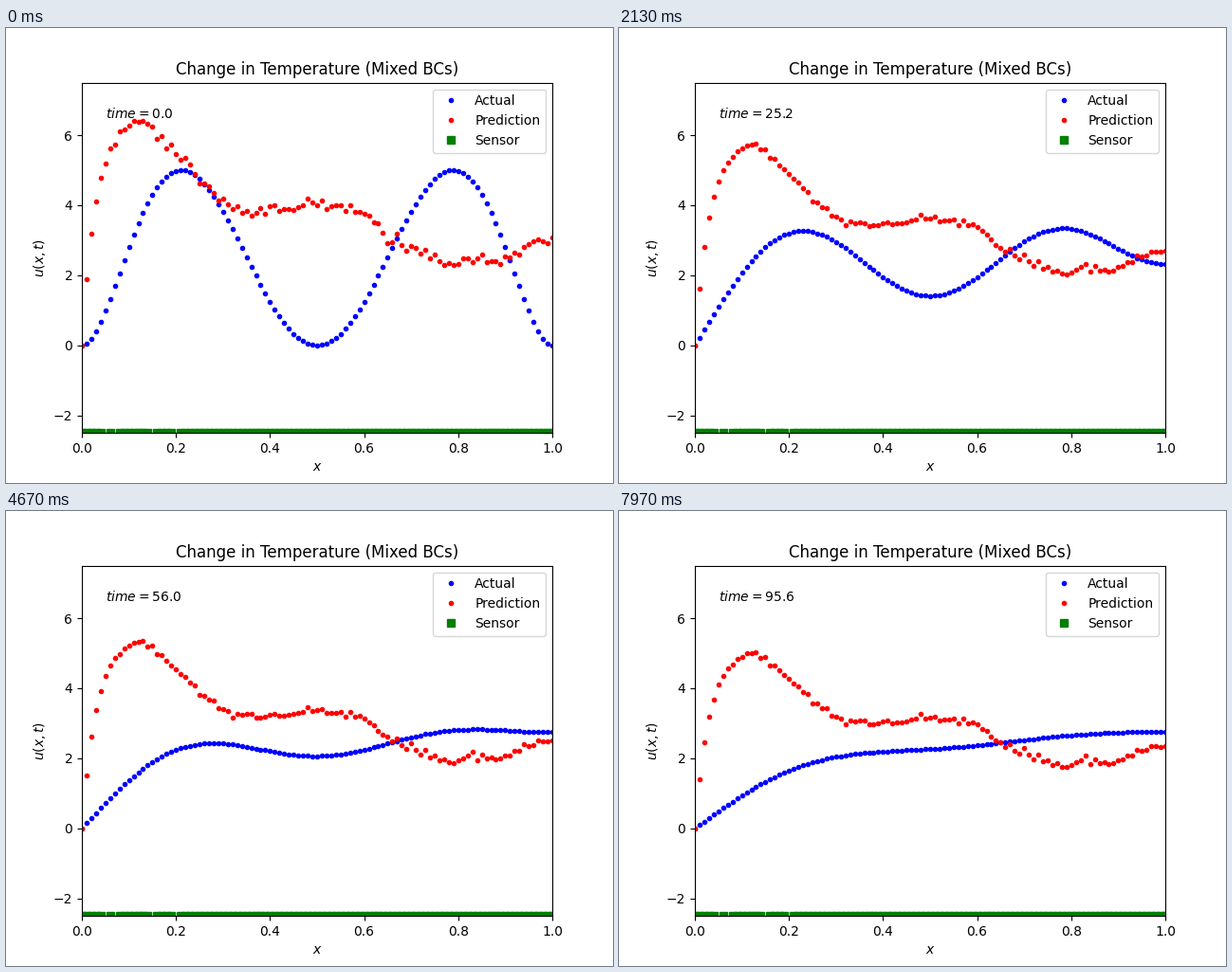
Write a matplotlib script that moves like this. It is 640 px wide and 480 px high and loops after 8 s.

```python
import numpy as np
import matplotlib.pyplot as plt
from matplotlib.animation import FuncAnimation

FRAMES = 240
LOOP_MS = 8000
DT = 0.4            # model time per frame
ALPHA = 3e-4        # diffusivity
T_REF = 36.4        # model time at which `profile` holds

x = np.linspace(0, 1, 101)


def initial(x):
    return 2160 * (x * (1 - x) * (x - 0.5)) ** 2


# Heat equation with u(0) = 0 and u_x(1) = 0, solved by its sine modes
k = (np.arange(80) + 0.5) * np.pi
s = (np.arange(4000) + 0.5) / 4000
coef = 2 * (initial(s) * np.sin(np.outer(k, s))).mean(axis=1)
modes = np.sin(np.outer(x, k))


def actual(t):
    return modes @ (coef * np.exp(-ALPHA * k ** 2 * t))


# Prediction: a steep rise into a bumpy slope, plus lasting and fading noise
key_x = [0, 0.13, 0.2, 0.25, 0.32, 0.4, 0.5, 0.59, 0.64, 0.75, 0.87, 1]
key_u = [5.7, 5.65, 4.78, 4.05, 3.38, 3.34, 3.54, 3.34, 2.78, 2.08, 2.12, 2.63]
profile = np.interp(x, key_x, key_u) * (1 - np.exp(-x / 0.031))

rng = np.random.default_rng(4)
ripple = 0.08 * np.sqrt(x) * rng.standard_normal(x.size)
jolt = 0.08 * rng.standard_normal(x.size)


def predicted(t):
    progress = np.log1p(t / 18) / np.log1p(T_REF / 18)
    return (profile * (1 + 0.15 * (1 - progress))
            + ripple + jolt * np.exp(-t / 12))


fig, ax = plt.subplots(figsize=(6.4, 4.8), dpi=100)
ax.set(xlim=(0, 1), ylim=(-2.5, 7.5), xlabel="$x$", ylabel="$u(x,t)$",
       title="Change in Temperature (Mixed BCs)")
actual_dots, = ax.plot(x, actual(0), "b.", label="Actual")
predicted_dots, = ax.plot(x, predicted(0), "r.", label="Prediction")
sensors = np.delete(x, [5, 7, 15, 20])
ax.plot(sensors, np.full_like(sensors, -2.5), "gs", label="Sensor")
clock = ax.text(0.05, 6.5, "")
ax.legend(loc="upper right")


def update(i):
    t = i * DT
    actual_dots.set_ydata(actual(t))
    predicted_dots.set_ydata(predicted(t))
    clock.set_text(f"$time = {t:.1f}$")
    return actual_dots, predicted_dots, clock


anim = FuncAnimation(fig, update, frames=FRAMES, interval=LOOP_MS / FRAMES,
                     repeat=True, repeat_delay=0)
plt.show()
```
